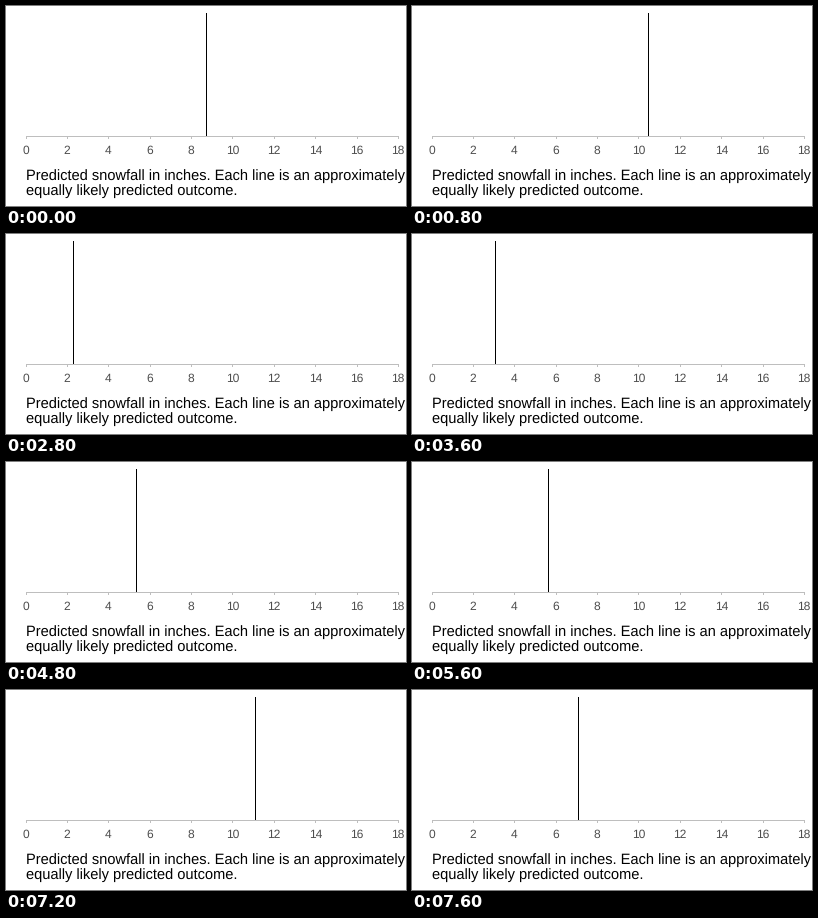
These frames come from a looping animation (400 px wide and 200 px high, 8000 ms). A matplotlib script:

```python
import matplotlib.pyplot as plt
from matplotlib.animation import FuncAnimation
from matplotlib.patches import Rectangle

WIDTH, HEIGHT, DPI = 400, 200, 72
FRAME_MS = 400
AXIS_LEFT, AXIS_Y, PX_PER_INCH = 19.5, 130, 20.7
LINE_TOP = 7

# Horizontal pixel of each predicted outcome, one per frame
OUTCOMES = [200, 119, 236, 263, 373, 207, 33, 67, 135, 83,
            159, 149, 130, 312, 136, 154, 161, 163, 249, 166]

plt.rcParams["font.family"] = "Liberation Sans"
plt.rcParams["text.hinting"] = "none"  # keeps natural letter widths
fig = plt.figure(figsize=(WIDTH / DPI, HEIGHT / DPI), dpi=DPI, facecolor="white")
ax = fig.add_axes([0, 0, 1, 1])
ax.set_xlim(0, WIDTH)
ax.set_ylim(HEIGHT, 0)
ax.axis("off")


def block(x, y, w, h, color):
    return ax.add_patch(Rectangle((x, y), w, h, facecolor=color,
                                  linewidth=0, antialiased=False))


def label(x, baseline, text, size, color, align="left"):
    ax.text(x, baseline, text, fontsize=size, color=color,
            ha=align, va="baseline")


block(20, AXIS_Y, 373, 1, "#bebebe")
for inches in range(0, 19, 2):
    x = AXIS_LEFT + inches * PX_PER_INCH
    block(round(x), AXIS_Y, 1, 3, "#bebebe")
    label(x, 148, str(inches), 12, "#4d4d4d", "center")

label(20, 174, "Predicted snowfall in inches. Each line is an approximately",
      14.6, "black")
label(20, 189, "equally likely predicted outcome.", 14.6, "black")

outcome = block(OUTCOMES[0], LINE_TOP, 1, AXIS_Y - LINE_TOP, "black")


def update(frame):
    outcome.set_x(OUTCOMES[frame])
    return (outcome,)


anim = FuncAnimation(fig, update, frames=len(OUTCOMES), interval=FRAME_MS,
                     repeat=True, repeat_delay=0, blit=False)
plt.show()
```
